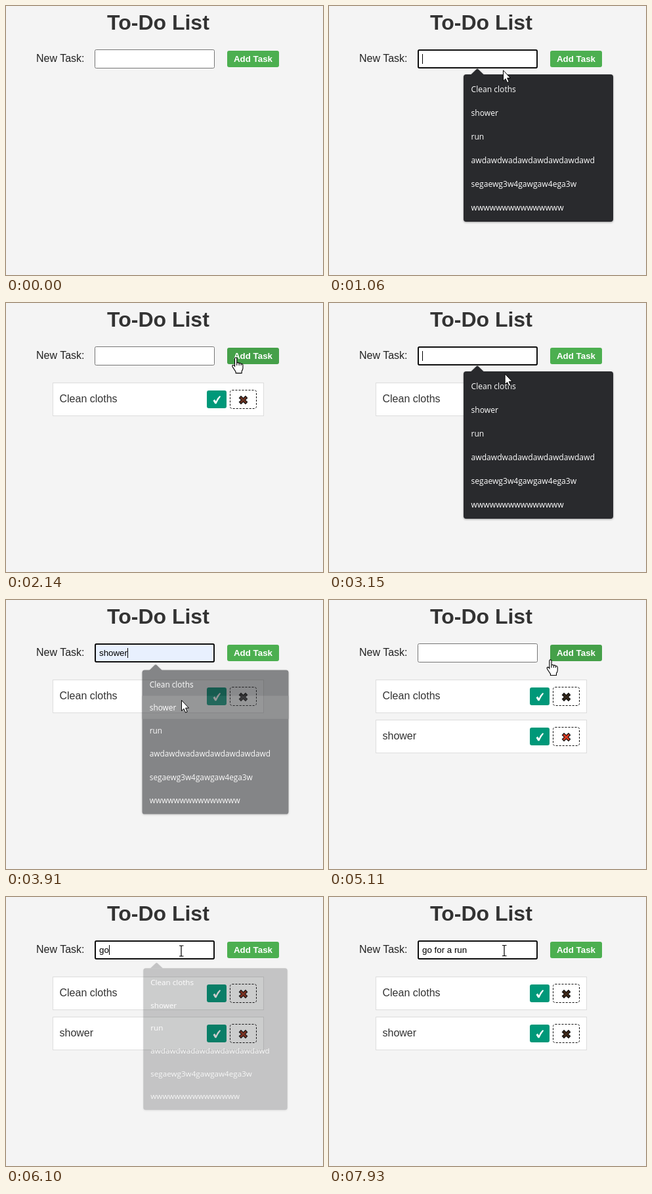
These frames come from a looping animation (483 by 409 pixels, 7990 ms). An HTML page:

```html
<!DOCTYPE html>
<html lang="en">
<head>
<meta charset="utf-8">
<title>To-Do List</title>
<style>
  html, body { margin: 0; width: 100%; height: 100%; overflow: hidden; background: #f4f4f4; }
  svg { display: block; font-family: "Liberation Sans", Arial, sans-serif; }
  text { white-space: pre; }
  #popup { filter: drop-shadow(0 1px 1.5px rgba(0, 0, 0, .35)); }
  #popup text { font: 12.1px "Open Sans", "Noto Sans", sans-serif; fill: #fff; }
</style>
</head>
<body>
<svg width="483" height="409" viewBox="0 0 483 409">
  <defs>
    <g id="row">
      <rect x="71.5" y="121.5" width="321" height="50" fill="#fff" stroke="#ddd"/>
      <rect x="306" y="133" width="30" height="27" rx="3" fill="#009879"/>
      <path d="M315.5 148.6L318 146.6L319.8 149.5Q322 144 325.5 141.2L327.2 142Q323 147.5 320.4 153.2H318.5Z" fill="#fff"/>
      <rect x="341.5" y="132.5" width="40" height="28" rx="3" fill="none" stroke="#111" stroke-dasharray="3 2"/>
      <path d="M356.3 142.7L366.7 152.3M366.7 142.7L356.3 152.3" stroke="#111" stroke-width="5"/>
      <path d="M357.2 143.5L365.8 151.5M365.8 143.5L357.2 151.5" stroke="currentColor" stroke-width="2.8"/>
    </g>
  </defs>
  <rect width="483" height="409" fill="#f4f4f4"/>
  <text x="154" y="36" font-size="32" font-weight="bold" fill="#333">To-Do List</text>
  <text x="46" y="85" font-size="16" fill="#222">New Task:</text>

  <rect id="field" x="135.5" y="66.5" width="182" height="28" rx="2" fill="#fff" stroke="#767676"/>
  <rect id="ring" x="136" y="67" width="181" height="27" rx="2" fill="#fff" stroke="#101010" stroke-width="2"/>
  <text id="value" x="142" y="85" font-size="13.333" fill="#000"></text>
  <rect id="caret" y="73" width="1" height="15" fill="#000"/>

  <rect id="add" x="337" y="68" width="79" height="25" rx="3"/>
  <text x="376.5" y="85" font-size="13.333" font-weight="bold" fill="#fff" text-anchor="middle">Add Task</text>

  <g id="task0"><use href="#row"/><text x="81.5" y="151" font-size="16" fill="#333">Clean cloths</text></g>
  <g id="task1" transform="translate(0 61)"><use href="#row"/><text x="81.5" y="151" font-size="16" fill="#333">shower</text></g>

  <g id="popup">
    <path d="M216 104.5L224.6 96.2Q226 95 227.4 96.2L236 104.5Z" fill="#292a2d"/>
    <rect x="205" y="104" width="228" height="224" rx="4" fill="#292a2d"/>
    <rect id="mark" x="205" width="228" height="36" fill="#404144"/>
  </g>

  <g id="cursor" stroke="#000">
    <path id="arrow" d="M.5 .5V16.6L4 13.3L6.6 19.2L9.2 18L6.6 12.2H11.5Z" fill="#fff"/>
    <path id="beam" d="M-3 -8H-1Q0 -8 0 -7Q0 -8 1 -8H3.5M0 -7V7M-3 8H-1Q0 8 0 7Q0 8 1 8H3.5" fill="none" stroke-width="1.2"/>
    <path id="hand" d="M-1.6 1.5A1.6 1.6 0 0 1 1.6 1.5V8Q3.5 6.8 5 8.6Q7 7.6 8 9.5Q10.5 8.8 10.8 11.5V16Q10.5 19 9 20.5V23.5H0V21.5L-4.6 14.5Q-6 12.3 -4.6 11.4Q-3.2 10.6 -1.6 13ZM1.6 8V12M5 8.6V12M8 9.5V12" fill="#fff" stroke-width="1.1"/>
  </g>
</svg>
<script>
const LOOP = 7990;
const $ = id => document.getElementById(id);
const show = (id, on) => { $(id).style.display = on ? '' : 'none'; };
const clamp = v => Math.max(0, Math.min(1, v));

const options = ['Clean cloths', 'shower', 'run', 'awdawdwadawdawdawdawdawd',
  'segaewg3w4gawgaw4ega3w', 'wwwwwwwwwwwwwww'];
options.forEach((label, i) => {
  const t = document.createElementNS('http://www.w3.org/2000/svg', 'text');
  t.setAttribute('x', 216.5);
  t.setAttribute('y', 131 + 36 * i);
  t.textContent = label;
  $('popup').append(t);
});

// Pointer path: time, x, y
const path = [
  [90, 405, 420], [200, 325, 185], [300, 262, 82], [1040, 262, 82], [1060, 265, 97],
  [1140, 267, 125], [1500, 267, 125], [1640, 325, 108], [1820, 394, 86], [2070, 394, 86],
  [2140, 350.5, 83], [2220, 322, 92], [2400, 288, 88], [2640, 267, 83],
  [3080, 267, 83], [3200, 268, 124], [3410, 268, 126], [3560, 267, 152],
  [4480, 267, 152], [4620, 325, 112], [4780, 375, 85], [5000, 375, 85],
  [5110, 338, 91], [5240, 267, 82], [7840, 267, 82], [7850, 267, 81.5]
];

// One round per task: focus, popup opens, popup starts closing, submit
const rounds = [
  { focus: 300, open: 730, close: 1280, submit: 2000, pick: 0 },
  { focus: 2630, open: 2820, close: 3774, submit: 4860, pick: 1 },
  { focus: 5240, open: 5350, close: 5870, submit: Infinity }
];

const typed = 'go for a run';
const keyTimes = [5870, 5990, 6150, 6180];
for (let i = 0; i < 8; i++) keyTimes.push(6880 + i * 75.7);
const blinkStarts = rounds.flatMap(r => [r.focus, r.open, r.close])
  .concat(3890, 6220, keyTimes).sort((a, b) => a - b);

const crossTones = [
  [[0, '#6b3322'], [2640, '#333'], [4490, '#33271a'], [5350, '#97351f'], [6170, '#3d2718']],
  [[0, '#d63a22'], [5350, '#97351f'], [6170, '#3d2718']]
];

function pointer(t) {
  const i = path.findIndex(p => p[0] > t);
  if (i < 0) return path[path.length - 1].slice(1);
  if (i === 0) return path[0].slice(1);
  const [t0, x0, y0] = path[i - 1], [t1, x1, y1] = path[i];
  const k = (t - t0) / (t1 - t0);
  return [x0 + (x1 - x0) * k, y0 + (y1 - y0) * k];
}

function render(t) {
  const [x, y] = pointer(t);
  const round = rounds.find(r => t >= r.focus && t < r.submit);
  const inField = x > 135 && x < 318 && y > 66 && y < 95;
  const onAdd = x > 337 && x < 416 && y > 68 && y < 93;

  let alpha = 0, row = -1, text = '', preview = false, filled = false;
  if (round) {
    alpha = t < round.close ? clamp((t - round.open + 20) / 80) : 1 - clamp((t - round.close) / 300);
    if (t < round.open) alpha = 0;
    if (alpha > 0 && x > 205 && y > 108) row = Math.floor((y - 108) / 36);
    if (round.pick === undefined) {
      text = typed.slice(0, keyTimes.filter(k => k <= t).length);
    } else if (t >= round.close) {
      text = options[round.pick];
      filled = true;
      if (alpha > 0) row = round.pick;
    } else if (row >= 0) {
      text = options[row];
      preview = filled = true;
    }
  }

  show('ring', round);
  $('ring').setAttribute('fill', filled ? '#e8f0fe' : '#fff');
  $('value').textContent = text;
  const since = t - blinkStarts.filter(b => b <= t).pop();
  show('caret', round && !preview && since % 1000 < 500);
  const width = text ? $('value').getComputedTextLength() : 0;
  $('caret').setAttribute('x', Math.round(142 + width));
  $('add').setAttribute('fill', onAdd ? '#45a049' : '#4caf50');

  crossTones.forEach((tones, i) => {
    show('task' + i, t >= rounds[i].submit);
    $('task' + i).style.color = tones.filter(c => c[0] <= t).pop()[1];
  });

  show('popup', alpha > 0);
  $('popup').setAttribute('opacity', alpha);
  $('popup').setAttribute('transform',
    `translate(319 216) scale(${0.952 + 0.048 * alpha}) translate(-319 -216)`);
  show('mark', row >= 0);
  $('mark').setAttribute('y', 108 + 36 * Math.max(row, 0));

  show('beam', inField);
  show('hand', onAdd);
  show('arrow', !inField && !onAdd);
  $('cursor').setAttribute('transform', `translate(${x} ${y})`);
}

const start = performance.now();
function tick() {
  render((performance.now() - start) % LOOP);
  requestAnimationFrame(tick);
}
render(0);
requestAnimationFrame(tick);
</script>
</body>
</html>
```
